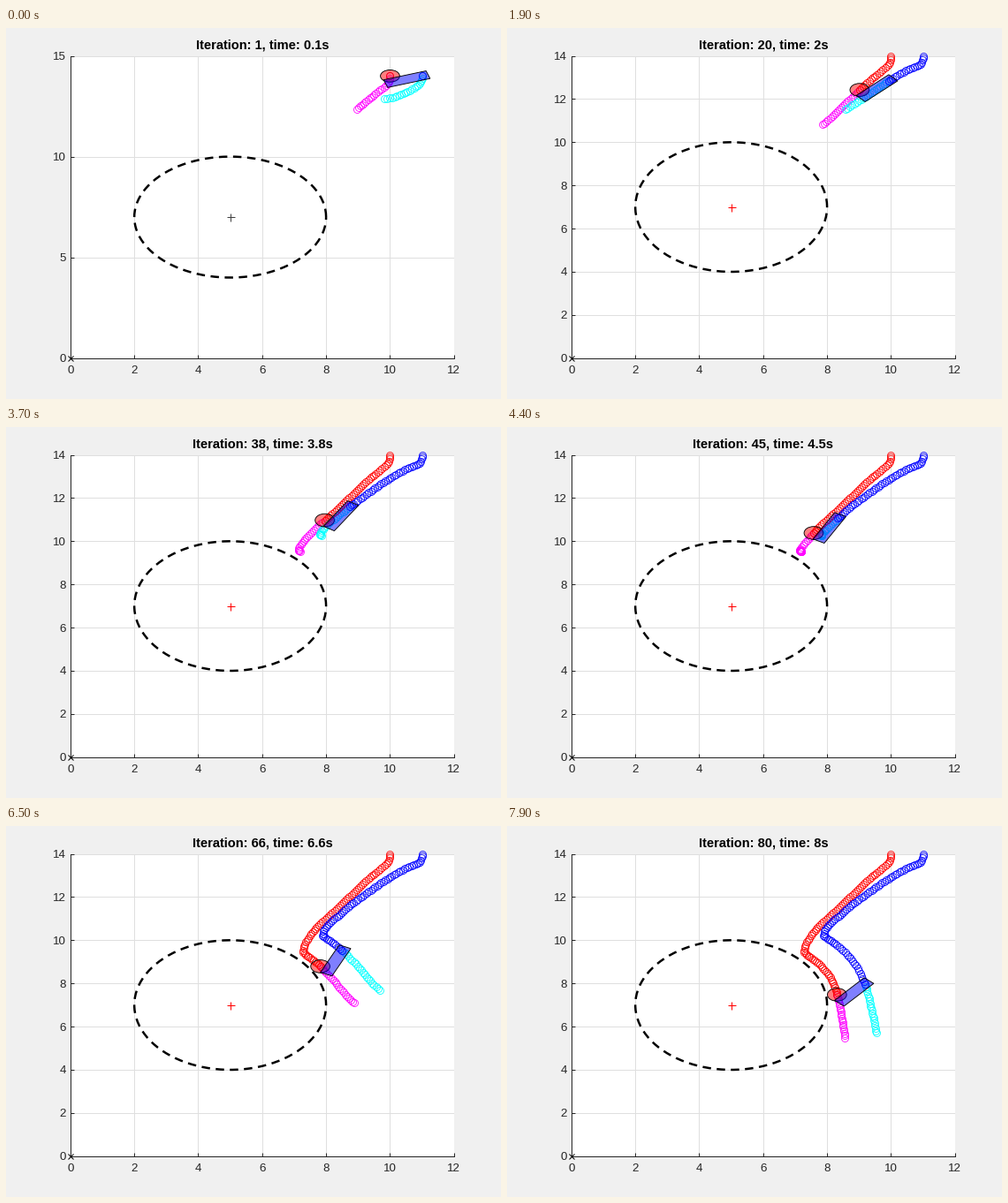
Write a matplotlib script that moves like this. It is 560 px wide and 420 px high and loops after 8000 ms.

```python
import numpy as np
import matplotlib.pyplot as plt
from matplotlib.animation import FuncAnimation
from matplotlib.patches import Ellipse, Polygon

DPI = 80
PX = 72 / DPI            # points per pixel
STEPS = 80
HORIZON = 20
DARK = "#262626"

plt.rcParams["font.family"] = "Liberation Sans"


def smooth(keys, vals, t):
    """Cubic Hermite curve through the key values."""
    keys, vals = np.asarray(keys, float), np.asarray(vals, float)
    t = np.asarray(t, float)
    slope = np.gradient(vals, keys)
    i = np.clip(np.searchsorted(keys, t, side="right") - 1, 0, len(keys) - 2)
    h = keys[i + 1] - keys[i]
    u = (t - keys[i]) / h
    return ((1 + 2 * u) * (1 - u) ** 2 * vals[i] + u * (1 - u) ** 2 * h * slope[i]
            + u * u * (3 - 2 * u) * vals[i + 1] + u * u * (u - 1) * h * slope[i + 1])


# Lead agent: step, x, y
LEAD = np.array([
    (0, 10, 14), (2, 9.99, 13.8), (4, 9.925, 13.612), (6, 9.813, 13.446),
    (9, 9.62, 13.215), (29, 8.44, 11.61), (44, 7.58, 10.38), (49, 7.37, 9.92),
    (52, 7.3, 9.63), (54, 7.29, 9.44), (56, 7.36, 9.33), (60, 7.55, 9.13),
    (65, 7.82, 8.79), (70, 8.06, 8.37), (75, 8.22, 7.9), (79, 8.31, 7.48),
    (89, 8.45, 6.49), (99, 8.56, 5.49)])
# Bearing from the lead agent to the follower: step, degrees
BEARING = np.array([(0, 0), (4, 1), (9, 11.5), (19, 25), (29, 34.5),
                    (44, 42.6), (54, 52.5), (65, 46.6), (79, 30)])
# End of the predicted path: step, x, y, bearing
GOAL = np.array([
    (0, 8.96, 12.35, 31), (9, 8.45, 11.61, 42), (29, 7.28, 10.01, 47),
    (36, 7.19, 9.52, 49), (45, 7.19, 9.5, 50), (54, 8.12, 8.66, 43),
    (63, 8.88, 7.27, 37.5), (65, 8.88, 7.09, 36), (72, 8.86, 6.3, 25),
    (79, 8.56, 5.49, 12.4)])


def lead_at(t):
    return np.array([smooth(LEAD[:, 0], LEAD[:, c], t) for c in (1, 2)])


def follow(lead, bearing):
    a = np.radians(bearing)
    return lead + np.array([np.cos(a), np.sin(a)])


steps = np.arange(STEPS)
lead = lead_at(steps)
bearing = smooth(BEARING[:, 0], BEARING[:, 1], steps)
mate = follow(lead, bearing)


def predict(n):
    j = np.arange(HORIZON + 1)
    s = j / HORIZON
    path = lead_at(n + j)
    gx, gy, gb = (np.interp(n, GOAL[:, 0], GOAL[:, c]) for c in (1, 2, 3))
    miss = np.array([[gx], [gy]]) - path[:, -1:]
    path = path + miss * s ** 2
    lag = 1 + 1.6 * max(0, 1 - n / 6)
    return path, follow(path, bearing[n] + (gb - bearing[n]) * s ** lag)


def car_corners(pos, angle):
    a = np.radians(angle)
    u = np.array([np.cos(a), np.sin(a)])
    v = np.array([-u[1], u[0]])
    return [pos + p * u + q * v
            for p, q in ((0.2, 0.2), (0.2, -0.2), (-1.2, -0.2), (-1.2, 0.2))]


fig = plt.figure(figsize=(560 / DPI, 420 / DPI), dpi=DPI, facecolor="#f0f0f0")
ax = fig.add_axes([0.13, 0.11, 0.775, 0.815])
ax.set_xlim(0, 12)
ax.set_xticks(range(0, 13, 2))
ax.set_axisbelow(True)
ax.grid(color="#dfdfdf", lw=PX)
ax.spines[["top", "right"]].set_visible(False)
for side in ("left", "bottom"):
    ax.spines[side].set(color=DARK, linewidth=PX)
ax.tick_params(direction="in", length=4.3 * PX, width=PX, color=DARK,
               labelcolor=DARK, labelsize=13.33 * PX)
ax.tick_params(axis="x", pad=8.5 * PX)
ax.tick_params(axis="y", pad=5 * PX)
title = fig.text(290 / 560, 1 - 24 / 420, "", ha="center", va="baseline",
                 weight="bold", size=14.67 * PX, color="black")

th = np.linspace(0, 2 * np.pi, 200)
ax.plot(5 + 3 * np.cos(th), 7 + 3 * np.sin(th), color="black", lw=2.5 * PX,
        ls=(0, (3.8, 2.6)), dash_capstyle="butt")
center, = ax.plot(5, 7, "+", ms=9 * PX, mew=PX)
ax.plot(0, 0, "x", color="black", ms=6 * PX, mew=PX, clip_on=False, zorder=4)


def rings(color):
    return ax.plot([], [], "o", mfc="none", mec=color, ms=8 * PX, mew=0.8 * PX,
                   clip_on=False, zorder=2.5)[0]


lead_plan, mate_plan = rings("magenta"), rings("cyan")
lead_trail, mate_trail = rings("red"), rings("blue")

disc = ax.add_patch(Ellipse((0, 0), 0.6, 0.6, fc=(1, 0, 0, 0.5), ec="black",
                            lw=0.9 * PX, zorder=3))
car = ax.add_patch(Polygon(np.zeros((4, 2)), closed=True, fc=(0, 0, 1, 0.5),
                           ec="black", lw=0.9 * PX, zorder=3.1))


def draw(n):
    # the axis fits the highest shape
    if lead[1, n] + 0.3 > 14:
        ax.set_ylim(0, 15)
        ax.set_yticks(range(0, 16, 5))
    else:
        ax.set_ylim(0, 14)
        ax.set_yticks(range(0, 15, 2))
    title.set_text(f"Iteration: {n + 1}, time: {(n + 1) / 10:g}s")
    center.set_color("red" if n else "#404040")
    plan_a, plan_b = predict(n)
    lead_plan.set_data(*plan_a)
    mate_plan.set_data(*plan_b)
    lead_trail.set_data(*lead[:, :n + 1])
    mate_trail.set_data(*mate[:, :n + 1])
    disc.set_center(lead[:, n])
    car.set_xy(car_corners(mate[:, n], bearing[n] + 18.5))
    return ()


anim = FuncAnimation(fig, draw, frames=STEPS, interval=100, repeat=True,
                     repeat_delay=0, init_func=lambda: draw(0))
plt.show()
```
